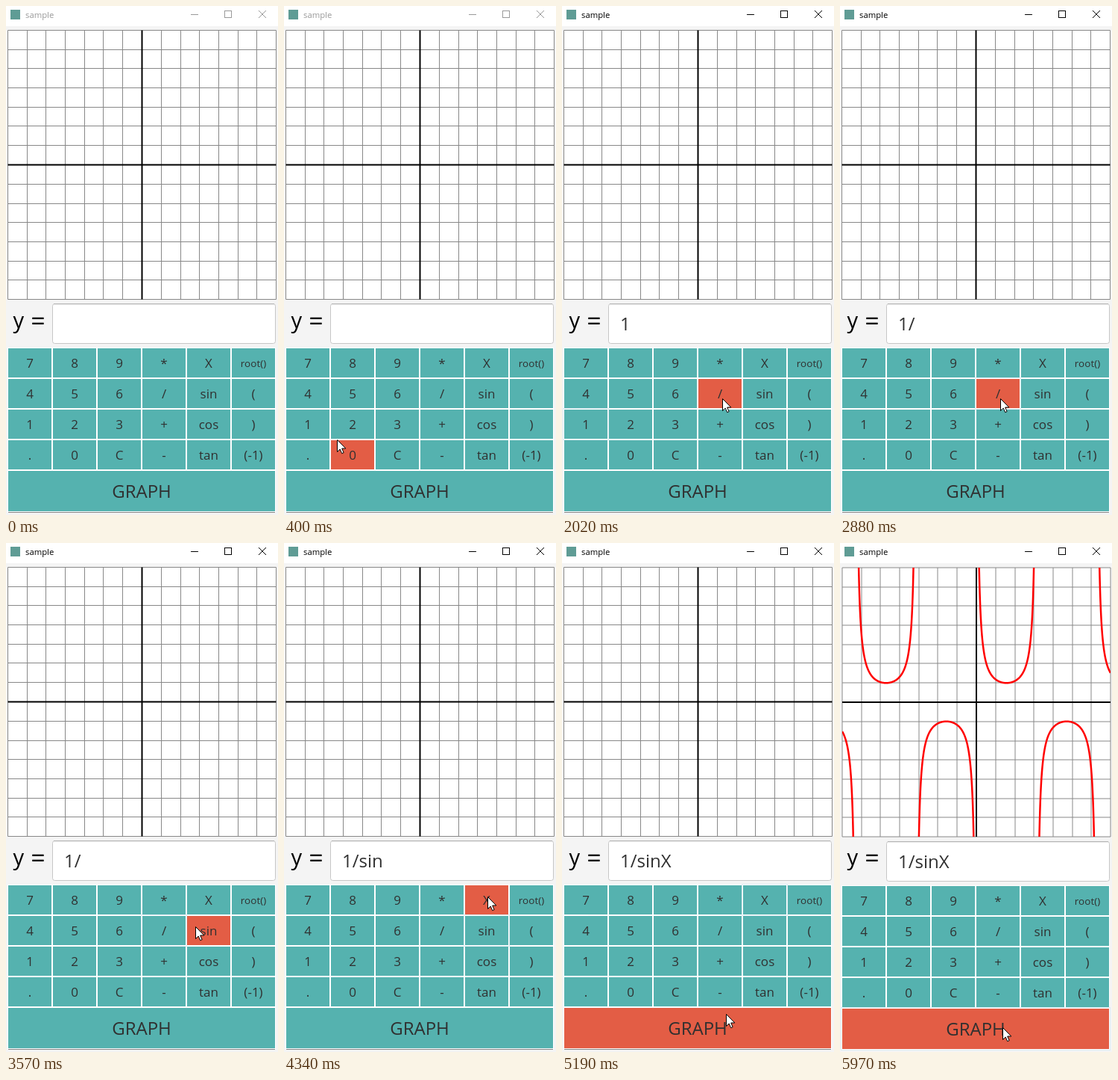
An HTML page with a canvas that plays this animation: 365x681 px, repeating every 7990 ms.

```html
<!DOCTYPE html>
<html lang="en">
<head>
<meta charset="utf-8">
<title>Graphing calculator</title>
<style>
  html, body { margin: 0; width: 100%; height: 100%; overflow: hidden; background: #f4f4f4; }
  canvas { display: block; width: 365px; height: 681px; }
</style>
</head>
<body>
<canvas id="stage"></canvas>
<script>
const W = 365, H = 681, LOOP = 7990;
const TEAL = '#55b2af', HOVER = '#e35d45', INK = '#303030';
const FONT = '"Open Sans", "Noto Sans", sans-serif';
const UNIT = 360 / 14;

const canvas = document.getElementById('stage');
const dpr = window.devicePixelRatio || 1;
canvas.width = W * dpr;
canvas.height = H * dpr;
const ctx = canvas.getContext('2d');

const rows = [
  ['7', '8', '9', '*', 'X', 'root()'],
  ['4', '5', '6', '/', 'sin', '('],
  ['1', '2', '3', '+', 'cos', ')'],
  ['.', '0', 'C', '-', 'tan', '(-1)']
];
const buttons = rows.flatMap((row, r) => row.map((label, c) => ({
  label, x: 3 + 60 * c, y: 458 + 41 * r, w: 58, h: 39,
  size: label === 'root()' ? 13.5 : 17, base: label === 'root()' ? 25 : 26
})));
buttons.push({ label: 'GRAPH', x: 3, y: 622, w: 358, h: 54, size: 24, base: 36 });

// Pointer strokes: each glides to (x, y) in a few discrete steps.
const START = { x: 150, y: 668 };
const strokes = [
  { from: 170, to: 559, steps: 6, x: 28, y: 532 },
  { from: 637, to: 870, steps: 4, x: 17, y: 552 },
  { from: 1330, to: 1870, steps: 8, x: 196, y: 525 },
  { from: 2020, to: 2020, steps: 1, x: 215, y: 525 },
  { from: 3260, to: 3570, steps: 5, x: 254, y: 513 },
  { from: 4030, to: 4340, steps: 5, x: 273, y: 473 },
  { from: 4890, to: 5190, steps: 5, x: 220, y: 630 },
  { from: 5270, to: 5420, steps: 3, x: 218, y: 648 }
];
// A press focuses its button; the release adds its label to the formula.
const clicks = [
  { press: 1100, release: 1170, label: '1' },
  { press: 2800, release: 2880, label: '/' },
  { press: 3800, release: 3880, label: 'sin' },
  { press: 4490, release: 4570, label: 'X' },
  { press: 5650, release: 5970, label: 'GRAPH' }
];
const ACTIVE_AT = clicks[0].press, PLOT_AT = clicks.at(-1).release;

function pointerAt(t) {
  if (t < strokes[0].from) return null;
  let pos = START;
  for (const s of strokes) {
    if (t < s.from) break;
    const gap = s.steps > 1 ? (s.to - s.from) / (s.steps - 1) : 1;
    const step = Math.min(s.steps, Math.floor((t - s.from) / gap + 0.02) + 1);
    const k = 1 - Math.pow(1 - step / s.steps, 1.5);
    pos = { x: pos.x + (s.x - pos.x) * k, y: pos.y + (s.y - pos.y) * k };
  }
  return pos;
}

function rect(x, y, w, h, color) {
  ctx.fillStyle = color;
  ctx.fillRect(x, y, w, h);
}

function text(str, x, y, size, color, align = 'left') {
  ctx.font = `${size}px ${FONT}`;
  ctx.textAlign = align;
  ctx.fillStyle = color;
  ctx.fillText(str, x, y);
}

function lines(segments, color, width) {
  ctx.strokeStyle = color;
  ctx.lineWidth = width;
  ctx.beginPath();
  for (const [x1, y1, x2, y2] of segments) {
    ctx.moveTo(x1, y1);
    ctx.lineTo(x2, y2);
  }
  ctx.stroke();
}

function drawTitleBar(active) {
  rect(0, 0, W, 27, '#fff');
  rect(6, 5, 13, 13, '#5f9c95');
  const color = active ? '#000' : '#999';
  text('sample', 26, 16, 11.3, color);
  lines([[248, 11.5, 258, 11.5], [339, 6, 349, 16], [349, 6, 339, 16]], color, 1);
  ctx.strokeRect(293.5, 6.5, 9, 9);
}

function drawCurve() {
  ctx.save();
  ctx.beginPath();
  ctx.rect(-180, -180, 360, 360);
  ctx.clip();
  ctx.strokeStyle = '#f00';
  ctx.lineWidth = 2.5;
  ctx.lineJoin = 'round';
  ctx.beginPath();
  let side = 0;
  for (let px = -180; px <= 180; px += 0.25) {
    const y = 1 / Math.sin(px / UNIT);
    if (!(Math.abs(y) < 9)) { side = 0; continue; }
    if (Math.sign(y) !== side) ctx.moveTo(px, -y * UNIT);
    else ctx.lineTo(px, -y * UNIT);
    side = Math.sign(y);
  }
  ctx.stroke();
  ctx.restore();
}

function drawGraph(plotted) {
  ctx.save();
  const shift = plotted ? 0.5 : 0;
  ctx.translate(182.5 + shift, 212.5 + shift);
  rect(-180, -180, 360, 360, '#fff');
  const grid = [];
  for (let i = -7; i <= 7; i++) {
    const p = Math.sign(i) * Math.round(Math.abs(i) * UNIT + 0.1);
    grid.push([p, -180, p, 180], [-180, p, 180, p]);
  }
  lines(grid, '#888', 1);
  lines([[0, -180, 0, 180], [-180, 0, 180, 0]], '#000', 2);
  if (plotted) drawCurve();
  ctx.restore();
}

function drawInput(value) {
  ctx.beginPath();
  ctx.roundRect(62.5, 398.5, 299, 53, 3);
  ctx.fillStyle = '#fff';
  ctx.fill();
  ctx.strokeStyle = '#c6c6c6';
  ctx.lineWidth = 1;
  ctx.stroke();
  lines([[64, 398.5, 360, 398.5]], '#b4b4b4', 1);
  lines([[64, 399.5, 360, 399.5]], '#ededed', 1);
  text(value, 78, 434, 24, INK);
}

function drawButtons(pointer, focused, plotted) {
  rect(2, 457, 360, 221, '#fff');
  if (!plotted) rect(3, 677, 358, 1, '#858585');
  for (const b of buttons) {
    const over = pointer && pointer.x >= b.x - 1 && pointer.x < b.x + b.w + 1 &&
      pointer.y >= b.y - 1 && pointer.y < b.y + b.h + 1;
    if (b.label === focused) {
      ctx.strokeStyle = '#dcebf2';
      ctx.lineWidth = 1;
      ctx.strokeRect(b.x - 1.5, b.y - 1.5, b.w + 3, b.h + 3);
    }
    rect(b.x, b.y, b.w, b.h, over ? HOVER : TEAL);
    text(b.label, b.x + b.w / 2, b.y + b.base, b.size, INK, 'center');
  }
}

function drawPointer({ x, y }) {
  ctx.save();
  ctx.translate(Math.round(x) + 0.5, Math.round(y) + 0.5);
  const arrow = new Path2D('M0 0V16L3.7 12.5 6.2 18.2 8.6 17.1 6.2 11.5H11.3Z');
  ctx.fillStyle = '#fff';
  ctx.fill(arrow);
  ctx.strokeStyle = '#000';
  ctx.lineWidth = 1;
  ctx.stroke(arrow);
  ctx.restore();
}

function draw(t) {
  const pointer = pointerAt(t);
  const plotted = t >= PLOT_AT;
  const focused = clicks.findLast(c => t >= c.press)?.label;
  const value = clicks.filter(c => t >= c.release && c.label !== 'GRAPH')
    .map(c => c.label).join('');
  ctx.setTransform(dpr, 0, 0, dpr, 0, 0);
  rect(0, 0, W, H, '#f4f4f4');
  drawTitleBar(t >= ACTIVE_AT);
  drawGraph(plotted);
  text('y', 9.5, 431, 29, '#000');
  text('=', 43, 434, 34, '#000', 'center');
  ctx.save();
  if (plotted) ctx.translate(0, 1);
  drawInput(value);
  drawButtons(pointer, focused, plotted);
  ctx.restore();
  if (pointer) drawPointer(pointer);
}

const begin = performance.now();
function tick() {
  draw((performance.now() - begin) % LOOP);
  requestAnimationFrame(tick);
}
tick();
</script>
</body>
</html>
```
